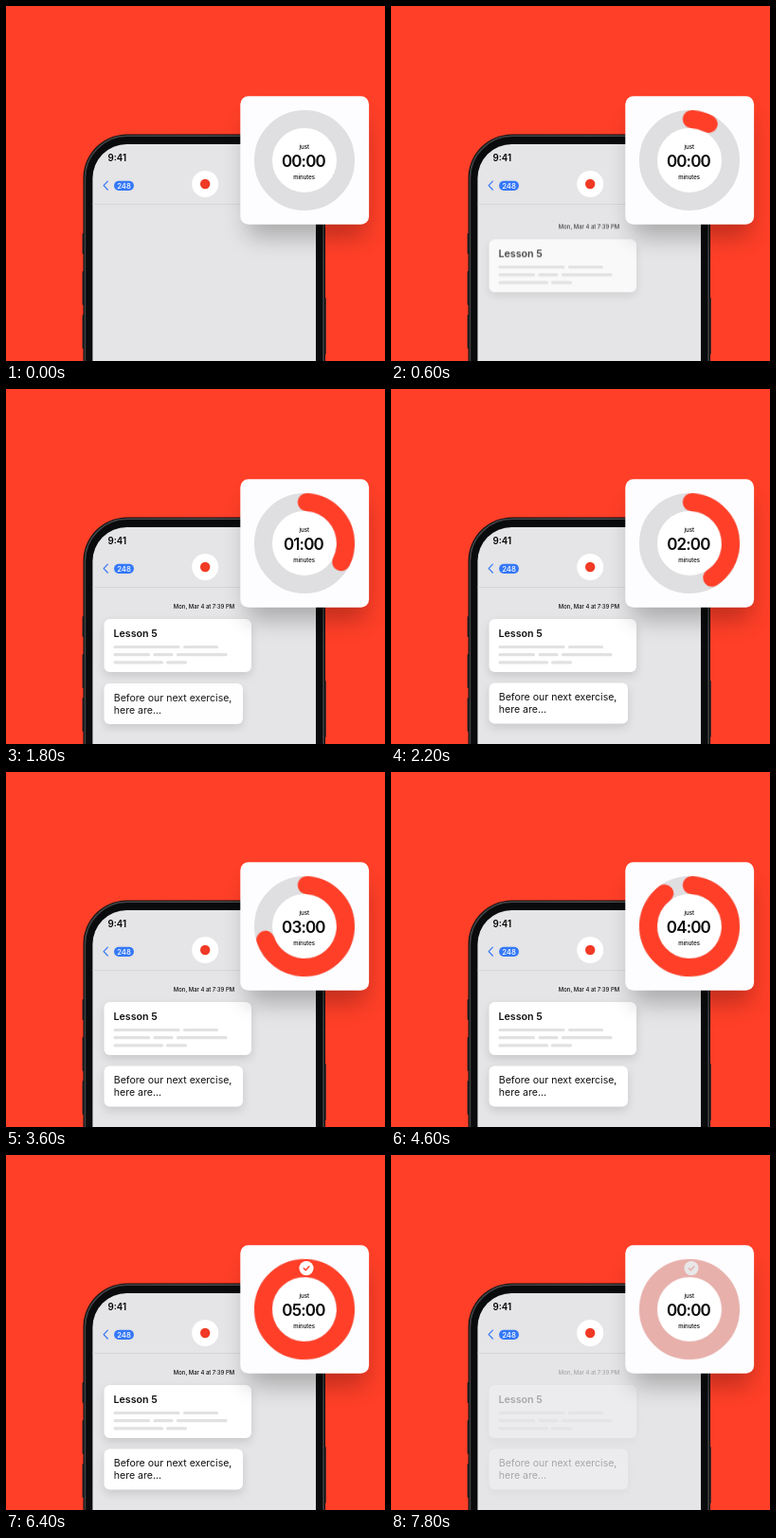
Recreate the animation shown at these times as an HTML page. Size 400 by 375 pixels, loop 7.87 s.

```html
<!DOCTYPE html>
<html lang="en">
<head>
<meta charset="utf-8">
<title>Lesson timer</title>
<style>
  html, body { margin: 0; width: 100%; height: 100%; overflow: hidden; background: #ff3f28; }
  svg { display: block; width: 100vw; height: 100vh; font-family: Inter, sans-serif; }
  .mid { text-anchor: middle; }
  .card { fill: #fff; filter: drop-shadow(0 4px 5px rgba(0, 0, 0, .12)); }
  .bars { stroke: #e1e1e2; stroke-width: 3.2; stroke-linecap: round; }
  .fade, .arc, .first, .second, .tick { animation: 7870ms linear infinite both; }
  .fade { animation-name: fade; }
  .arc { animation-name: sweep; }
  .first { animation-name: first; }
  .second { animation-name: second; }
  .tick { animation-name: tick; transform-origin: 317px 119.6px; }

  @keyframes fade {
    0%, 94.92% { opacity: 1; }
    100% { opacity: .14; }
  }
  @keyframes sweep {
    0% { opacity: 0; stroke-dasharray: 0 400; animation-timing-function: step-end; }
    3.43% { opacity: 1; stroke-dasharray: 0 400; }
    45.74% { opacity: 1; stroke-dasharray: 248 400; animation-timing-function: cubic-bezier(.333, .458, .667, .97); }
    72.05%, 100% { opacity: 1; stroke-dasharray: 360 400; }
  }
  @keyframes first {
    0%, 4.2% { opacity: 0; transform: translateY(14px); animation-timing-function: ease-out; }
    10.2%, 100% { opacity: 1; transform: none; }
  }
  @keyframes second {
    0%, 17.8% { opacity: 0; transform: translateY(14px); animation-timing-function: ease-out; }
    23.8%, 100% { opacity: 1; transform: none; }
  }
  @keyframes tick {
    0%, 77.9% { opacity: 0; transform: scale(.3); animation-timing-function: ease-out; }
    81.3%, 100% { opacity: 1; transform: none; }
  }
</style>
</head>
<body>
<svg viewBox="0 0 400 375" preserveAspectRatio="none">
  <defs>
    <linearGradient id="rim" x2="1" y2="0">
      <stop offset="0" stop-color="#3f4042"/>
      <stop offset=".5" stop-color="#4c4e50"/>
      <stop offset="1" stop-color="#3f4042"/>
    </linearGradient>
    <filter id="soft" x="-40%" y="-40%" width="180%" height="180%">
      <feGaussianBlur stdDeviation="12"/>
    </filter>
    <clipPath id="glass"><rect x="91.4" y="146" width="235.6" height="300" rx="36"/></clipPath>
  </defs>

  <rect width="400" height="375" fill="#ff3f28"/>

  <!-- phone -->
  <g fill="#2a2a2c">
    <rect x="80.5" y="240" width="3" height="22" rx="1"/>
    <rect x="80.5" y="280" width="3" height="36" rx="1"/>
    <rect x="80.5" y="326" width="3" height="36" rx="1"/>
    <rect x="335" y="308" width="2.8" height="60" rx="1"/>
  </g>
  <rect x="81.5" y="135.4" width="255.5" height="320" rx="46.5" fill="#0a0b0c"/>
  <rect x="83.4" y="137.3" width="251.7" height="320" rx="44.6" fill="none" stroke="url(#rim)" stroke-width="1.6"/>
  <g clip-path="url(#glass)">
    <rect x="91" y="146" width="236" height="230" fill="#e5e4e6"/>
    <path d="M91 209.5H327" stroke="#d3d2d4" stroke-width=".8"/>
  </g>
  <text x="107.5" y="164.3" font-size="9.7" font-weight="600">9:41</text>
  <path d="M107.3 185.2l-4.2 4.4 4.2 4.4" fill="none" stroke="#3478f6" stroke-width="1.2" stroke-linecap="round" stroke-linejoin="round"/>
  <rect x="114" y="184.7" width="21" height="10.2" rx="5.1" fill="#3478f6"/>
  <text class="mid" x="124.5" y="192.7" font-size="7.8" font-weight="500" fill="#fff">248</text>
  <circle cx="210.2" cy="188" r="14" fill="#fff"/>
  <circle cx="210.2" cy="188" r="5.2" fill="#f03a25"/>

  <!-- messages -->
  <g class="fade">
    <g class="first">
      <text class="mid" x="209" y="232.2" font-size="5.95" font-weight="500" fill="#111">Mon, Mar 4 at 7:39 PM</text>
      <rect class="card" x="103.5" y="243" width="155.5" height="56" rx="6"/>
      <text x="113.5" y="262" font-size="10.7" font-weight="600" fill="#111">Lesson 5</text>
      <path class="bars" d="M115 272.5H182M188.5 272.5H222.5M115 280.7H150.5M157 280.7H175M181.5 280.7H232M115 288.8H164.5M170.5 288.8H189.5"/>
    </g>
    <g class="second">
      <rect class="card" x="103.5" y="310.5" width="146.5" height="43" rx="6"/>
      <g font-size="10.55" fill="#111">
        <text x="113.8" y="329.4">Before our next exercise,</text>
        <text x="113.8" y="342.3">here are...</text>
      </g>
    </g>
  </g>

  <!-- timer -->
  <rect x="254" y="118" width="126" height="126" rx="9" opacity=".25" filter="url(#soft)"/>
  <rect x="247.3" y="95.2" width="135.8" height="135.6" rx="8.5" fill="#fdfcfe"/>
  <circle cx="315" cy="163" r="43.5" fill="#fff" stroke="#dfdee0" stroke-width="19"/>
  <g class="fade">
    <circle class="arc" cx="315" cy="163" r="43.5" pathLength="360" transform="rotate(-87 315 163)" fill="none" stroke="#ff3f28" stroke-width="19" stroke-linecap="round"/>
    <g class="tick">
      <circle cx="317" cy="119.6" r="7.6" fill="#fff"/>
      <path d="M314.3 119.8l2 2 3.6-4" fill="none" stroke="#ff3f28" stroke-width="1.4" stroke-linecap="round" stroke-linejoin="round"/>
    </g>
  </g>
  <g class="mid" fill="#0b0b0b">
    <text x="314.8" y="150.5" font-size="6.2" font-weight="500">just</text>
    <text id="count" x="313.9" y="170" font-size="17" font-weight="600" letter-spacing="-.85">00:00</text>
    <text x="314.6" y="182.5" font-size="6" font-weight="500">minutes</text>
  </g>
</svg>
<script>
  const LOOP = 7870;
  const count = document.getElementById('count');
  // [time in ms, minutes shown from then on]
  const flips = [[0, 0], [1224, 1], [2179, 2], [3133, 3], [4087, 4], [5250, 5],
                 [7130, 3], [7200, 2], [7270, 1], [7330, 0]];
  let start;

  function draw(now) {
    start ??= now;
    const t = (now - start) % LOOP;
    const label = `0${flips.findLast(([at]) => at <= t)[1]}:00`;
    if (count.textContent !== label) count.textContent = label;
    requestAnimationFrame(draw);
  }
  requestAnimationFrame(draw);
</script>
</body>
</html>
```
